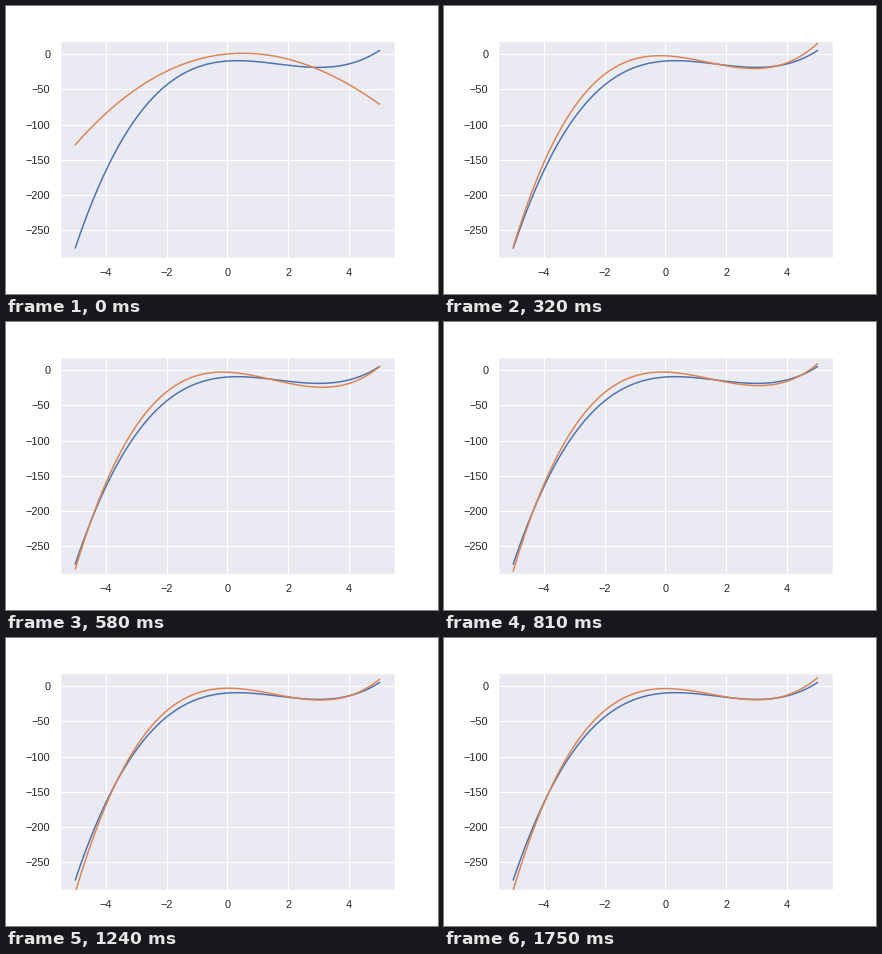
Animation of 432 by 288 pixels, one loop 3 s. Source, as a matplotlib script:

```python
import matplotlib.pyplot as plt
import numpy as np
from matplotlib.animation import FuncAnimation

STEP = 10  # ms per frame
LOOP = 3000

# Key fits: time in ms -> coefficients from x^3 down to the constant.
KEYS = {
    0: (0.07, -4, 4, 0),
    50: (1.32, -5.25, -1.6, -1.5),
    320: (1.23, -5.06, -1.9, -2.6),
    580: (1.22, -5.42, -1.8, -3.2),
    950: (1.22, -5.39, -0.75, -2.9),
    1240: (1.2, -5.54, 0.25, -3.2),
    1460: (1.2, -5.56, 0.15, -3.4),
    1750: (1.2, -5.4, 0.1, -3.7),
}

# The fit jumps at these moments and holds still in between.
JUMPS = np.r_[0, 20, 50, 250:320:3j, 370:580:5j, 620, 810:950:3j,
              1050, 1240, 1380:1460:3j, 1560:1750:3j]

plt.rcParams.update({
    "font.family": "Liberation Sans",
    "font.size": 11,
    "axes.facecolor": "#EAEAF2",
    "axes.edgecolor": "white",
    "axes.linewidth": 1.25,
    "axes.axisbelow": True,
    "grid.color": "white",
    "grid.linewidth": 1,
    "lines.linewidth": 1.5,
    "lines.solid_capstyle": "round",
})


def coefficients(ms):
    """Blend the key fits at the latest jump before the given time."""
    jump = JUMPS[JUMPS <= ms][-1]
    return [np.interp(jump, list(KEYS), column)
            for column in zip(*KEYS.values())]


fig, ax = plt.subplots(figsize=(6, 4), dpi=72)
fig.subplots_adjust(left=0.125, right=0.9, bottom=0.125, top=0.88)
ax.grid(True)
ax.tick_params(length=0, pad=9.5, labelcolor="#262626")
ax.set(xlim=(-5.5, 5.5), ylim=(-289, 19),
       xticks=range(-4, 5, 2), yticks=range(-250, 1, 50))

x = np.linspace(-5, 5, 100)
ax.plot(x, np.polyval([1, -5, 3, -10], x), color="#4C72B0")
guess, = ax.plot(x, np.polyval(coefficients(0), x), color="#DD8452")


def update(frame):
    guess.set_ydata(np.polyval(coefficients(frame * STEP), x))
    return guess,


anim = FuncAnimation(fig, update, frames=LOOP // STEP, interval=STEP,
                     repeat=True, repeat_delay=0)
plt.show()
```
